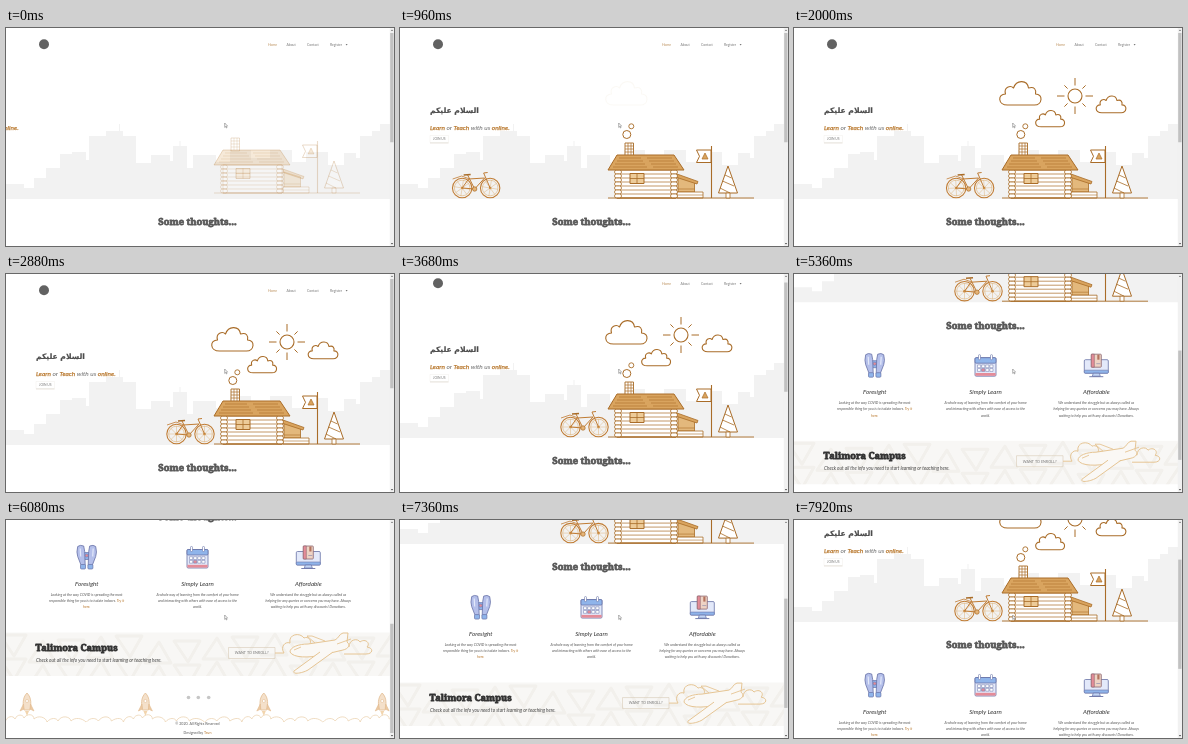
Write an HTML page with a canvas that moves like this. It is 388x218 px and loops after 8000 ms.

```html
<!DOCTYPE html>
<html lang="en">
<head>
<meta charset="utf-8">
<title>Learn or teach online</title>
<style>
html, body { margin: 0; width: 100%; height: 100%; overflow: hidden; background: #fff; }
canvas { display: block; width: 100vw; height: 100vh; }
</style>
</head>
<body>
<canvas id="stage"></canvas>
<script>
const W = 388, H = 218, PAGE = 415, LOOP = 8000, STEP = 80;
const BROWN = '#a96c28', ORANGE = '#d9a45f', PALE = '#e6c594', DARK = '#4c4c4c', LINK = '#b9792f';
const HAND = 'Lato, "Open Sans", sans-serif';
const SLAB = '"Noto Serif", "DejaVu Serif", serif';
const canvas = document.getElementById('stage');
const c = canvas.getContext('2d');

const clamp = v => Math.max(0, Math.min(1, v));
const span = (t, a, b) => clamp((t - a) / (b - a));
const outQuad = p => 1 - (1 - p) ** 2;
const outCubic = p => 1 - (1 - p) ** 3;

// time, scroll offset
const scrollKeys = [[0, 0], [3600, 0], [3680, 7], [3920, 48], [4160, 92], [4360, 114], [5080, 114],
  [5280, 142], [5380, 143], [5480, 154], [5720, 188], [5920, 197], [7000, 197], [7920, 69], [8000, 58]];

function scrollAt(t) {
  const i = scrollKeys.findIndex(k => k[0] > t);
  const [a, x] = scrollKeys[i - 1], [b, y] = scrollKeys[i];
  return x + (y - x) * (t - a) / (b - a);
}

function group(draw, { x = 0, y = 0, s = 1, a = 1 } = {}) {
  if (a <= 0) return;
  c.save();
  c.translate(x, y);
  c.scale(s, s);
  c.globalAlpha *= a;
  draw();
  c.restore();
}

function paint(fill, stroke, lw = 0.8) {
  if (fill) { c.fillStyle = fill; c.fill(); }
  if (stroke) { c.strokeStyle = stroke; c.lineWidth = lw; c.stroke(); }
}

function poly(pts, fill, stroke, lw, open) {
  c.beginPath();
  for (let i = 0; i < pts.length; i += 2) c.lineTo(pts[i], pts[i + 1]);
  if (!open) c.closePath();
  paint(fill, stroke, lw);
}

const line = (pts, stroke, lw) => poly(pts, null, stroke, lw, true);

function rect(x, y, w, h, fill, stroke, lw, r = 0) {
  c.beginPath();
  c.roundRect(x, y, w, h, r);
  paint(fill, stroke, lw);
}

function circle(x, y, r, fill, stroke, lw) {
  c.beginPath();
  c.arc(x, y, r, 0, 7);
  paint(fill, stroke, lw);
}

function curve(d, fill, stroke, lw) {
  const p = new Path2D(d);
  if (fill) { c.fillStyle = fill; c.fill(p); }
  if (stroke) { c.strokeStyle = stroke; c.lineWidth = lw; c.stroke(p); }
}

function text(s, x, y, size, color, { font = HAND, style = '', align = 'left', heavy = 0 } = {}) {
  c.font = `${style} ${size}px ${font}`;
  c.textAlign = align;
  c.textBaseline = 'alphabetic';
  c.fillStyle = c.strokeStyle = color;
  c.fillText(s, x, y);
  if (heavy) {
    c.lineWidth = heavy;
    c.strokeText(s, x, y);
  }
  return c.measureText(s).width;
}

// a centred line that ends in a coloured part
function linked(s, link, x, y, size, color, style) {
  c.font = `${style} ${size}px ${HAND}`;
  const left = x - c.measureText(s + link).width / 2;
  text(link, left + text(s, left, y, size, color, { style }), y, size, LINK, { style });
}

function skyline() {
  // left edge, roof height
  const roofs = [[0, 156], [18, 160], [28, 150], [40, 140], [54, 126], [66, 124], [80, 132], [83, 108],
    [100, 103], [117, 108], [130, 135], [145, 127], [164, 133], [167, 118], [181, 140], [187, 127],
    [210, 134], [224, 122], [245, 130], [264, 122], [286, 134], [300, 124], [322, 137], [338, 125],
    [350, 130], [354, 108], [366, 103], [374, 96], [384, 171]];
  const pts = [0, 171];
  roofs.forEach(([x, y], i) => {
    pts.push(x, y, roofs[i + 1] ? roofs[i + 1][0] : 384, y);
  });
  poly(pts.concat(384, 171), '#f2f2f2');
  rect(113, 96, 1, 9, '#f2f2f2');
  rect(173.5, 113, 1, 6, '#f2f2f2');
}

function cloud(x, y, s) {
  group(() => curve('M8 24C-2 24-2 13 6 13C4 6 11 4 14 7C17-2 28-1 29 7C35 5 37 9 36 13C44 13 43 24 35 24Z',
    '#fff', BROWN, 1.1 / s), { x, y, s });
}

function sun() {
  circle(281, 68, 7, '#fff', BROWN, 1.1);
  for (let i = 0; i < 8; i++) {
    const u = Math.cos(i * Math.PI / 4), v = Math.sin(i * Math.PI / 4);
    const far = i % 2 ? 15 : 18;
    line([281 + u * 10.5, 68 + v * 10.5, 281 + u * far, 68 + v * far], BROWN, 1);
  }
}

function house() {
  rect(225, 115, 8.5, 13, '#fff', BROWN, 0.9);
  for (let y = 118; y < 127; y += 3) line([225, y, 233.5, y], BROWN, 0.7);
  line([228, 115, 228, 127], BROWN, 0.7);
  line([231, 115, 231, 127], BROWN, 0.7);

  poly([278, 149, 294.5, 154, 294.5, 164, 278, 164], '#e3b87c', BROWN, 0.8);
  poly([277, 146, 298, 153.5, 297, 156, 277, 149.5], ORANGE, BROWN, 0.8);
  line([278, 161, 294.5, 161], BROWN, 0.6);
  rect(277, 164, 26, 6, '#fff', BROWN, 0.8);
  line([277, 167, 303, 167], BROWN, 0.6);

  rect(217, 142, 59, 28, '#fff', BROWN, 0.9);
  for (let y = 142; y < 169; y += 4) {
    line([217, y + 4, 276, y + 4], BROWN, 0.7);
    rect(214.5, y, 7, 4, '#fff', BROWN, 0.8, 2);
    rect(270.5, y, 7, 4, '#fff', BROWN, 0.8, 2);
  }
  rect(230, 145.5, 14, 10, '#edcb98', BROWN, 1);
  line([237, 145.5, 237, 155.5], BROWN, 0.8);
  line([230, 150.5, 244, 150.5], BROWN, 0.8);

  poly([217, 127, 274, 127, 284, 142, 208, 142], ORANGE, BROWN, 1);
  for (let i = 0; i < 4; i++) {
    const y = 130 + i * 3, x = 217 - i * 2;
    line([x + 2, y, x + 24 + i * 4, y], BROWN, 0.6);
    line([x + 30 + i * 4, y, 272 + i * 2, y], BROWN, 0.6);
  }
  line([208, 170, 354, 170], BROWN, 0.9);

  line([311.5, 118, 311.5, 170], BROWN, 1.1);
  poly([311, 122, 296.5, 122, 299.5, 128.3, 296.5, 134.5, 311, 134.5], '#fff', BROWN, 1);
  poly([305, 125, 308, 131, 302, 131], ORANGE, BROWN, 0.7);

  poly([328, 138, 337.5, 165, 318.5, 165], '#fff', BROWN, 1);
  line([325, 147, 331.5, 150], BROWN, 0.8);
  line([322.5, 153, 334, 158], BROWN, 0.8);
  line([320, 160, 330, 165], BROWN, 0.8);
  rect(326, 165, 4, 5, '#fff', BROWN, 0.8);
}

function smoke() {
  circle(231.3, 98.3, 2.5, '#fff', BROWN, 0.9);
  circle(226.8, 106.5, 4, '#fff', BROWN, 1);
}

function bike(turn) {
  const tone = '#c07c34';
  for (const x of [11.5, 39.5]) {
    circle(x, 160, 9.7, null, tone, 1.1);
    circle(x, 160, 7.8, null, ORANGE, 0.5);
    circle(x, 160, 1.3, tone);
    for (let i = 0; i < 8; i++) {
      const a = turn + i * Math.PI / 4;
      line([x, 160, x + 8 * Math.cos(a), 160 + 8 * Math.sin(a)], ORANGE, 0.4);
    }
  }
  poly([11.5, 160, 18, 151, 34, 150, 24, 161], null, tone, 1);
  line([24, 161, 17, 147], tone, 1);
  line([39.5, 160, 33, 145, 37, 144.5], tone, 1);
  line([13, 147, 20, 146.5], BROWN, 1.6);
  line([2, 151, 11, 148, 19, 151], tone, 0.8);
  circle(24, 161, 2.2, '#e5b478', BROWN, 0.7);
}

function hero(t) {
  skyline();
  circle(38, 16.3, 5, '#626262');
  ['Home', 'About', 'Contact', 'Register'].forEach((s, i) =>
    text(s, [262, 280.5, 301, 324][i], 17.8, 3.4, i ? '#777' : '#b98b55'));
  poly([339.6, 16, 341.6, 16, 340.6, 17.4], '#777');

  const fall = outQuad(span(t, -160, 880));
  group(house, { y: -7 * (1 - fall), a: 0.06 + 0.94 * fall ** 1.3 });
  group(smoke, { a: span(t, 560, 960) });
  [[205.5, 53, 1], [241.5, 82, 0.7], [302, 67.5, 0.72]].forEach(([x, y, s], i) =>
    group(() => cloud(x, y, s), { a: span(t, 940 + i * 120, 1400 + i * 120) }));
  group(sun, { a: span(t, 1000, 1500) });

  const ride = 209 * (1 - outQuad(span(t, 400, 2400)));
  group(() => bike(-ride / 10), { x: 159 - ride });

  group(() => {
    text('السلام عليكم', 77, 84.5, 7.6, DARK,
      { font: '"DejaVu Sans", sans-serif', style: 'bold', align: 'right', heavy: 0.2 });
    let x = 30;
    [['Learn', 1], [' or ', 0], ['Teach', 1], [' with us ', 0], ['online.', 1]].forEach(([s, hot]) => {
      x += text(s, x, 102, 6.5, hot ? LINK : '#666', { style: 'italic', heavy: hot ? 0.25 : 0 });
    });
    rect(30, 107.5, 18.5, 7, '#fff', '#eeeae5', 0.4);
    line([30, 115, 48.5, 115], '#d8d0c6', 0.6);
    text('JOIN US', 33, 112, 3.3, '#777');
  }, { x: -97 * (1 - outCubic(span(t, 0, 880))) });
}

const OUTLINE = '#6872a6', BLUE = '#8fb4ea', MIST = '#e3e9fa', PINK = '#e58c98';

function binoculars() {
  rect(-3, -5, 6, 7, BLUE, OUTLINE, 0.7);
  for (const k of [-1, 1]) {
    c.save();
    c.scale(k, 1);
    curve('M3-11.5Q6.5-13 9-11Q10.5-5 9-1L5.5 8H1.5L2-6Z', '#b4bfea', OUTLINE, 0.8);
    line([6.5, -9, 6, -1], MIST, 1.2);
    rect(1.2, 7, 5, 4.5, BLUE, OUTLINE, 0.7, 1);
    c.restore();
  }
  circle(0, -2, 1.5, PINK, OUTLINE, 0.5);
}

function calendar() {
  rect(-10.5, -8, 21, 18.5, MIST, OUTLINE, 0.8, 1.2);
  rect(-10.5, -8, 21, 5.5, BLUE, OUTLINE, 0.8, 1.2);
  for (const x of [-6, 6]) rect(x - 1, -11, 2, 5, '#fff', OUTLINE, 0.6, 0.8);
  for (let i = 0; i < 8; i++)
    rect(-8 + i % 4 * 4.1, -0.8 + Math.floor(i / 4) * 3.7, 3.2, 2.8, i === 5 ? PINK : '#fff', OUTLINE, 0.5);
  rect(-10.1, 7.3, 20.2, 2.8, PINK);
}

function computer() {
  rect(-12, -6, 24, 13.5, MIST, OUTLINE, 0.8, 1.2);
  rect(-12, 4.5, 24, 3, BLUE, OUTLINE, 0.6, 0.8);
  poly([-3, 7.5, 3, 7.5, 4, 10.5, -4, 10.5], '#c3d6f5', OUTLINE, 0.7);
  line([-7, 11, 7, 11], OUTLINE, 0.9);
  rect(-5, -11.5, 10, 13, '#eed3c4', '#8c6670', 0.8, 0.8);
  rect(-5, -11.5, 3, 13, PINK, '#8c6670', 0.6);
  rect(1, -11, 2.2, 5, '#b3735f');
  line([0, -2, 4, -2], OUTLINE, 0.5);
}

const columns = [
  { x: 80.7, start: 3920, icon: binoculars, title: 'Foresight', body: [
    ['Looking at the way COVID is spreading the most'],
    ['responsible thing for you is to isolate indoors. ', 'Try it'], ['', 'here.']] },
  { x: 191.5, start: 4270, icon: calendar, title: 'Simply Learn', body: [
    ['A whole way of learning from the comfort of your home'],
    ['and interacting with others with ease of access to the'], ['world.']] },
  { x: 302.3, start: 4440, icon: computer, title: 'Affordable', body: [
    ['We understand the struggle but as always called us'],
    ['helping for any queries or concerns you may have. Always'],
    ['waiting to help you with any discounts! Donations.']] },
];

function thoughts(t) {
  text('Some thoughts...', 191.5, 197.3, 9.4, '#585858',
    { font: SLAB, style: '900', align: 'center', heavy: 0.8 });
  for (const { x, start, icon, title, body } of columns) {
    const p = span(t, start, start + 600);
    group(icon, { x, y: 234.5, s: 0.3 + 0.7 * outQuad(p), a: clamp(p * 2) });
    text(title, x, 263, 6.2, '#333', { style: 'italic', align: 'center' });
    body.forEach(([s, link = ''], i) => linked(s, link, x, 273 + i * 6.2, 3.6, '#555', 'italic'));
  }
}

function plane() {
  rect(222.5, 324.5, 46.5, 11, null, '#d9cbb8', 0.6);
  text('WANT TO ENROLL?', 245.7, 331.4, 3.7, '#777', { align: 'center' });
  curve('M269 330H278C274 324 279 318 284 320C282 311 294 309 298 315C302 313 306 317 304 321', null, PALE, 1);
  curve('M284 329C284 324 293 321 302 321L329 317C333 315 333 311 337 310H342L341 319' +
    'C345 322 342 326 337 327L316 332C303 335 287 335 284 329Z', '#faf8f5', PALE, 1);
  curve('M314 329L288 348C286 352 297 350 302 347L327 329', '#faf8f5', PALE, 1);
  curve('M309 320L301 313H306L319 318M331 321L345 316M288 327L295 324', null, PALE, 0.9);
  curve('M343 324C343 316 352 315 354 319C359 315 365 320 361 324C368 325 367 331 360 331H338',
    null, PALE, 1);
}

function banner(t) {
  c.save();
  c.beginPath();
  c.rect(0, 309.5, 384, 43.5);
  c.clip();
  rect(0, 309, 384, 45, '#f8f7f5');
  for (let i = 0; i < 14; i++) {
    const x = i * 29 - 6, y = 322 + i * 7 % 9, k = i % 2 ? 1 : -1;
    for (const d of [0, 24])
      poly([x, y + d + 10 * k, x + 14, y + d - 11 * k, x + 26, y + d + 10 * k], null, '#f2f0ec', 3);
  }
  c.restore();
  text('Talimora Campus', 29.5, 328.3, 9.2, '#333', { font: SLAB, style: '900', heavy: 0.8 });
  text('Check out all the info you need to start learning or teaching here.', 30, 339.2, 4.7, '#444',
    { style: 'italic' });
  const p = outQuad(span(t, 4720, 5300));
  group(plane, { x: 90 * (1 - p), a: p });
}

function rocket() {
  const edge = '#e3bd92';
  curve('M0 -12C5 -7 4 0 3 5H-3C-4 0-5-7 0-12Z', '#f4e0ca', edge, 0.8);
  poly([-3.5, -1, -7, 6, -3, 4], '#ecc9a2', edge, 0.6);
  poly([3.5, -1, 7, 6, 3, 4], '#ecc9a2', edge, 0.6);
  circle(0, -4, 1.5, '#fff', edge, 0.6);
  poly([-2, 6, 2, 6, 0, 11], '#f2d5ae');
}

function footer() {
  c.save();
  c.beginPath();
  c.rect(0, 353, 384, 62);
  c.clip();
  for (let i = 0; i < 4; i++) {
    const x = 21 + i * 118.4;
    group(rocket, { x, y: 382 });
    group(() => curve('M-59 4C-55-1-49 0-47 3C-43-3-35-2-34 3C-28-1-23 0-22 4C-20-2-14-3-12 1' +
      'C-10-4-4-4-3 0C0-5 7-4 7 1C11-3 19-1 20 4C24-1 30 0 31 3C34-3 43-2 44 3C48-1 55 0 59 4',
      null, '#ecd5b4', 0.8), { x, y: 395 });
  }
  c.restore();
  [182.5, 192.3, 202.7].forEach(x => circle(x, 374.5, 1.8, '#c6c6c6'));
  text('© 2020. All Rights Reserved', 191.5, 402.3, 3.6, '#555', { align: 'center' });
  linked('Designed by ', 'Tavn', 191.5, 410.8, 3.6, '#555', '');
}

function scrollbars(t, top) {
  const wide = t >= 4280 && t < 5120, end = wide ? 213.5 : H;
  const track = end - 10;
  rect(383.8, 0, 4.2, H, '#f1f1f1');
  rect(384.2, 5 + top / PAGE * track, 3.3, end / PAGE * track, '#c1c1c1');
  poly([386, 1.6, 387.1, 3, 384.9, 3], '#777');
  poly([386, end - 1.6, 387.1, end - 3, 384.9, end - 3], '#444');
  if (!wide) return;
  rect(0, 213.5, 384, 4.5, '#f1f1f1');
  rect(5, 214, 367, 3.5, '#c1c1c1');
  poly([1.6, 215.8, 3, 214.7, 3, 216.9], '#777');
  poly([382, 215.8, 380.6, 214.7, 380.6, 216.9], '#444');
}

function pointer() {
  poly([218.7, 95, 218.7, 99.4, 219.7, 98.5, 220.4, 100, 221, 99.6, 220.4, 98.3, 221.6, 98.1],
    '#fff', '#666', 0.5);
}

function render(t) {
  const k = devicePixelRatio || 1;
  const w = Math.round(innerWidth * k), h = Math.round(innerHeight * k);
  if (canvas.width !== w || canvas.height !== h) { canvas.width = w; canvas.height = h; }
  c.setTransform(w / W, 0, 0, h / H, 0, 0);
  c.lineJoin = 'round';
  rect(0, 0, W, H, '#fff');
  const top = scrollAt(t);
  group(() => {
    hero(t);
    thoughts(t);
    banner(t);
    footer();
  }, { y: -top });
  scrollbars(t, top);
  pointer();
}

const began = performance.now();
function tick() {
  const t = (performance.now() - began) % LOOP;
  render(Math.floor(t / STEP) * STEP);
  requestAnimationFrame(tick);
}
tick();
</script>
</body>
</html>
```
